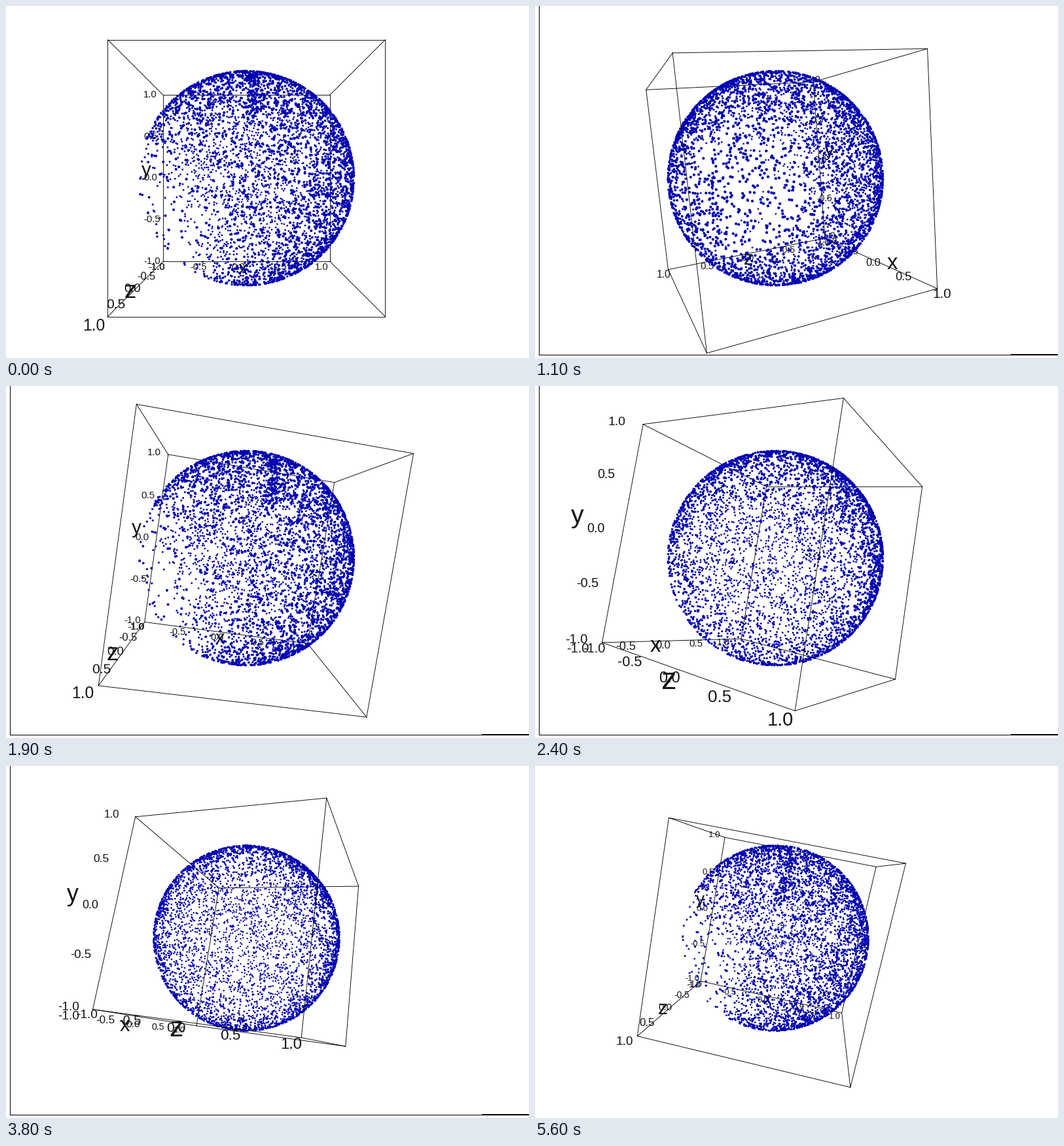
Animation, 799 px wide and 539 px high, one loop 5700 ms. Source, as a matplotlib script:

```python
import numpy as np
import matplotlib.pyplot as plt
from matplotlib.animation import FuncAnimation
from matplotlib.patches import Rectangle

W, H, DPI = 799, 539, 128
PX = 72 / DPI
FOCAL = 636
CX, CY = 367.4, 263.6
NEAR, FAR = 4.0, 4.589

# camera path: frame, yaw, pitch, roll in degrees
PATH = np.array([
    (6, 0, 0, 0), (11, -68.8, 7, 5), (12, -72, 7.3, 5.2), (19, 5.1, 3.6, -8.8),
    (24, 55.9, -3.8, -9.2), (27, 65.9, -13.2, -8.1), (42, 65.9, -13.2, -8.1),
    (45, 22, 1.2, -10), (46, 22, 1.2, -10), (47, -4.9, 10.1, -11.2)])


def spin(axis, angle):
    """Right-handed rotation about one coordinate axis."""
    m = np.eye(3)
    i, j = (axis + 1) % 3, (axis + 2) % 3
    m[i, i] = m[j, j] = np.cos(angle)
    m[j, i] = np.sin(angle)
    m[i, j] = -m[j, i]
    return m


def view(i):
    yaw, pitch, roll = (np.radians(np.interp(i, PATH[:, 0], col)) for col in PATH.T[1:])
    return spin(2, roll) @ spin(0, pitch) @ spin(1, yaw), NEAR if i < 38 else FAR


def project(p, dist):
    scale = FOCAL / (dist - p[..., 2])
    return CX + p[..., 0] * scale, CY - p[..., 1] * scale


def unit(v):
    return v / np.linalg.norm(v, axis=-1, keepdims=True)


def make_cloud():
    """Random unit vectors, thinned around one direction, with one dense streak."""
    rng = np.random.default_rng(4)
    v = unit(rng.normal(size=(6000, 3)))
    toward = v @ unit(np.array([-.88, -.40, .2]))
    v = v[rng.random(len(v)) < np.clip((.85 - toward) / .65, .06, 1)]
    el = np.radians(rng.uniform(27, 68, 100))
    streak = unit(np.c_[rng.normal(.05, .04, 100), np.sin(el), np.cos(el)])
    return np.vstack([v, streak])


cloud = make_cloud()
corners = [np.array((x, y, z)) for x in (-1, 1) for y in (-1, 1) for z in (-1, 1)]
edges = [np.array((a, b)) for n, a in enumerate(corners) for b in corners[n + 1:]
         if np.abs(a - b).sum() == 2]

fig = plt.figure(figsize=(W / DPI, H / DPI), dpi=DPI, facecolor="white")
ax = fig.add_axes([0, 0, 1, 1])
ax.set_xlim(0, W)
ax.set_ylim(H, 0)
ax.axis("off")

dots = ax.scatter(cloud[:, 0], cloud[:, 1], s=1, c="#0000b0", linewidths=0, zorder=2)
lines = [ax.plot([], [], color="black", lw=.9 * PX)[0] for _ in edges]
border = [ax.add_patch(Rectangle((x, y), w, h, fc="black", lw=0, antialiased=False))
          for x, y, w, h in ((6, 0, 1, 535), (6, 534, 793, 1), (727, 533, 72, 2))]

# labels sit outside the box edge, then shift on screen
TICK_OUT = np.array((-.06, -.10, -.14))
TITLE_OUT = np.array((-.10, -.155, -.30))
TICK_EM, TITLE_EM = 73.5, 147
labels = []


def add_label(text, axis, value, out, left, up, em):
    at = np.full(3, -1.0)
    at[axis] = value
    push = np.where(np.arange(3) == axis, 0, out)
    art = ax.text(0, 0, text, family="Liberation Sans", color="#141414",
                  ha="left", va="baseline")
    labels.append((art, at, push, np.array((-left, up, 0)), em))


for axis, (name, tick_left, title_left, lift) in enumerate(
        [("x", .18, .10, 0), ("y", .175, .165, .03), ("z", .12, .075, 0)]):
    for value in np.linspace(-1, 1, 5):
        add_label(f"{value:.1f}", axis, value, TICK_OUT, tick_left, -lift, TICK_EM)
    add_label(name, axis, 0, TITLE_OUT, title_left, lift, TITLE_EM)


def layer(depth):
    return 3 if depth > 0 else 1


def draw(i):
    rot, dist = view(i)
    p = cloud @ rot.T
    dots.set_offsets(np.c_[project(p, dist)])
    dots.set_sizes((13 / (dist - p[:, 2]) * PX) ** 2)
    for line, edge in zip(lines, edges):
        ends = edge @ rot.T
        line.set_data(*project(ends, dist))
        line.set_zorder(layer(ends[:, 2].mean()))
    for art, at, push, shift, em in labels:
        depth = (rot @ at)[2]
        q = rot @ (at + push) + shift
        q[2] = depth
        art.set_position(project(q, dist))
        art.set_fontsize(em / (dist - depth) * PX)
        art.set_zorder(layer(depth))
    for bar in border:
        bar.set_visible(7 <= i < 56)
    return [dots, *lines, *border]


anim = FuncAnimation(fig, draw, frames=57, interval=100, init_func=lambda: draw(0),
                     repeat=True, repeat_delay=0, blit=False)
plt.show()
```
